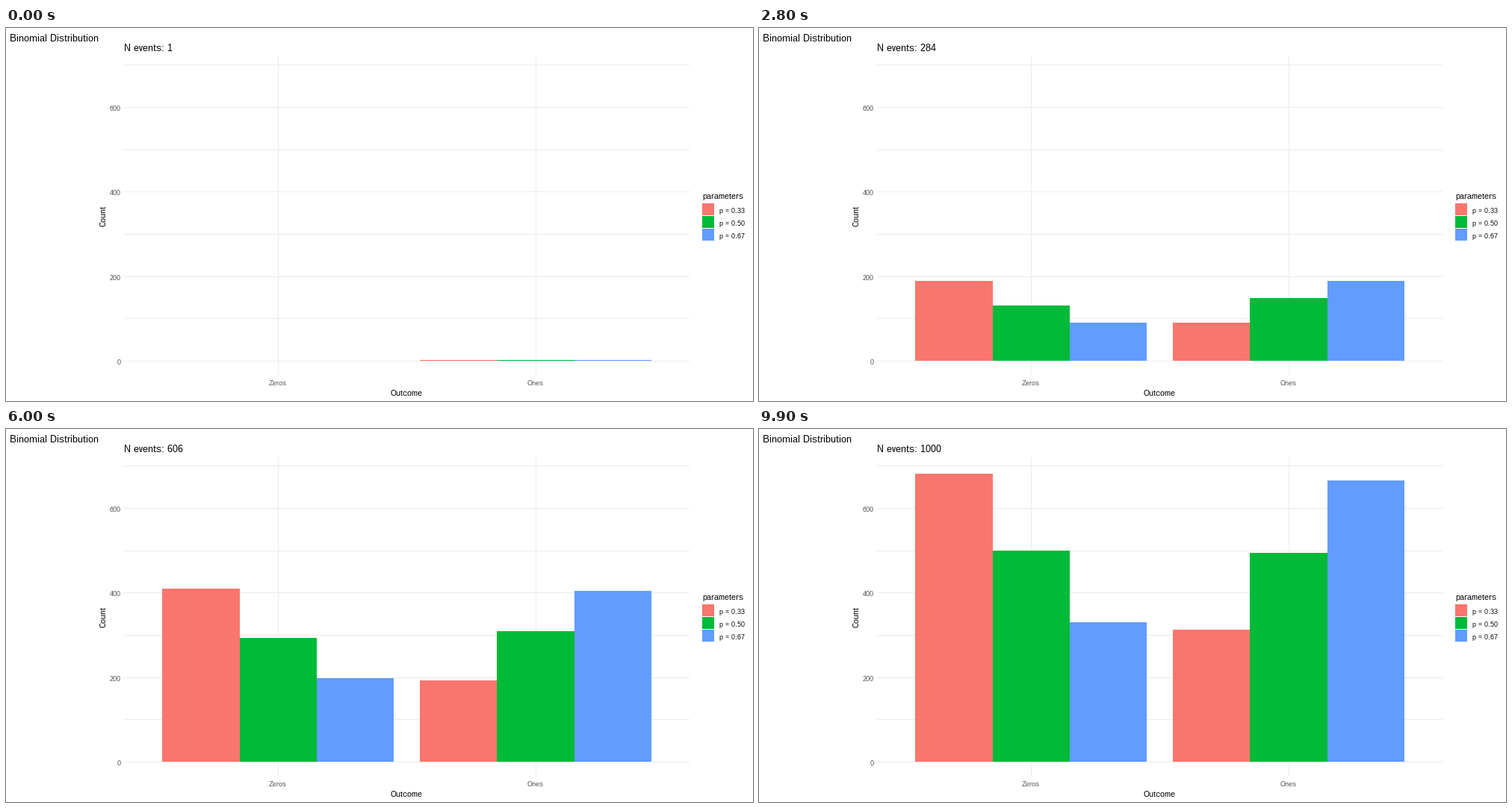
Recreate the animation shown at these times as a matplotlib script. Size 1000 by 500 pixels, loop 10 s.

```python
import matplotlib.pyplot as plt
import numpy as np
from matplotlib.animation import FuncAnimation
from matplotlib.patches import Rectangle

plt.rcParams.update({
    "font.family": "Liberation Sans",
    "text.hinting": "native",
    "text.hinting_factor": 1,
})

W, H, DPI = 1000, 500, 100
FRAMES, INTERVAL = 100, 100
BASE = 446                    # pixel row of count zero
UNIT = 340 / 600              # pixels per event
LAG = 3.5                     # bars trail the counter by a few events
BAR_W = 310 / 3
COLORS = "#F8766D", "#00BA38", "#619CFF"
GRID, TICK = "#EBEBEB", "#4D4D4D"

# Random walk of the counts, pinned at a few key frames
KEYS = [0, 19, 38, 60, 75, 87, 99]
RED_ONES = [1, 67, 117, 193, 239, 278, 314]
GREEN_ZEROS = [0, 89, 177, 293, 374, 430, 501]
BLUE_ZEROS = [0, 55, 129, 198, 256, 290, 331]

fig = plt.figure(figsize=(W / DPI, H / DPI), dpi=DPI, facecolor="white")
ax = fig.add_axes([0, 0, 1, 1])
ax.set(xlim=(0, W), ylim=(H, 0))
ax.axis("off")


def box(x, y, w, h, color, z=1):
    return ax.add_patch(Rectangle((x, y), w, h, fc=color, lw=0,
                                  antialiased=False, zorder=z))


def label(x, y, text, px, color="black", ha="left", **kw):
    return ax.text(x, y, text, size=px * 72 / DPI, color=color, ha=ha,
                   va="baseline", **kw)


def row(count):
    """Pixel row of the top of a bar; any count shows at least one row."""
    top = round(BASE + 0.5 - count * UNIT)
    return min(top, BASE - 1) if count > 0 else BASE


def events(i):
    return round(1 + i * 999 / (FRAMES - 1))


def counts(i):
    """Zeros and ones, each in legend order."""
    total = max(events(i) - LAG, 1)
    red, green, blue = (np.interp(i, KEYS, v)
                        for v in (RED_ONES, GREEN_ZEROS, BLUE_ZEROS))
    return (total - red, green, blue), (red, total - green, total - blue)


# Grid and count axis
for n in range(0, 800, 100):
    y = round(BASE - n * UNIT)
    box(158, y, 757, 1, GRID)
    if n % 200 == 0 and n < 700:
        label(153.5, y + 5, str(n), 9, TICK, "right")
for x, name in ((364, "Zeros"), (709, "Ones")):
    box(x, 38, 1, 427, GRID)
    label(x, 479, name, 9, TICK, "center")

# Titles
label(5, 18, "Binomial Distribution", 13)
counter = label(158, 31, "", 13)
label(536.5, 493, "Outcome", 11, ha="center")
label(134, 251.5, "Count", 11, ha="center", rotation=90,
      rotation_mode="anchor")

# Legend
label(932, 229, "parameters", 11)
for k, (color, p) in enumerate(zip(COLORS, ("0.33", "0.50", "0.67"))):
    y = 235 + 17 * k
    box(932, y, 16, 16, color)
    label(955, y + 13, f"p = {p}", 9)


def make_group(left):
    edges = [round(left + k * BAR_W) for k in range(4)]
    return [box(a, BASE, b - a, 0, c, 3)
            for a, b, c in zip(edges, edges[1:], COLORS)]


bars = make_group(209.3) + make_group(554)


def draw(i):
    counter.set_text(f"N events: {events(i)}")
    zeros, ones = counts(i)
    for bar, count in zip(bars, zeros + ones):
        top = row(count)
        bar.set_y(top)
        bar.set_height(BASE - top)
    return [counter, *bars]


anim = FuncAnimation(fig, draw, frames=FRAMES, interval=INTERVAL,
                     init_func=lambda: draw(0), repeat=True, repeat_delay=0)
plt.show()
```
